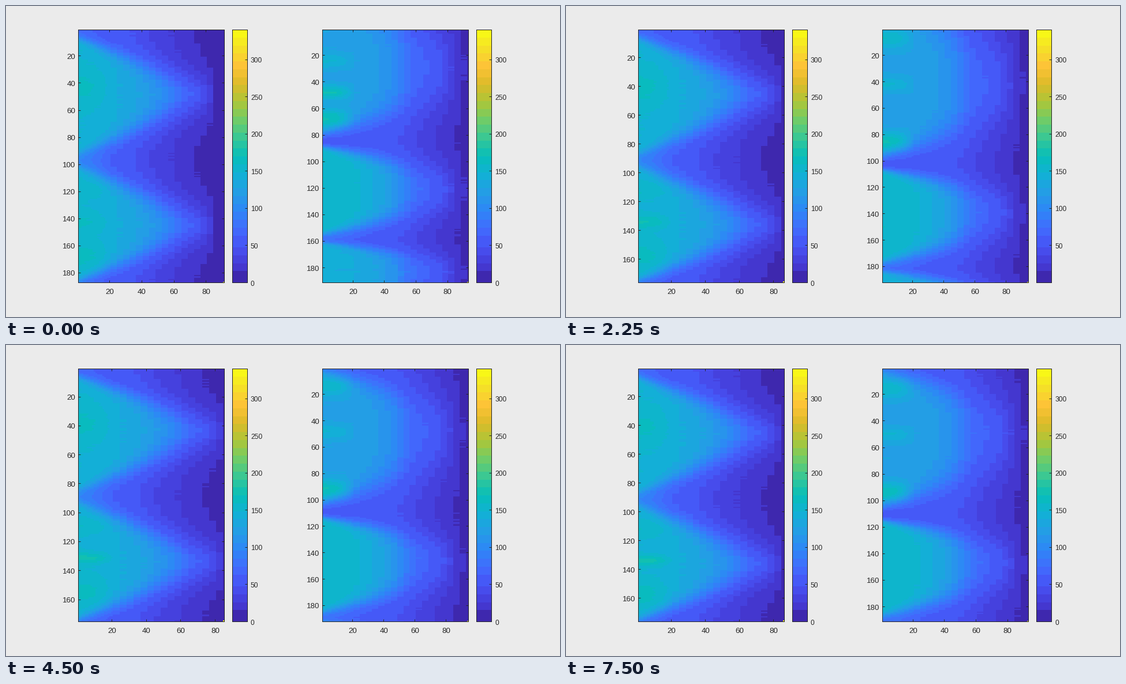
Recreate the animation shown at these times as a matplotlib script. Size 960 by 540 pixels, loop 8 s.

```python
import numpy as np
import matplotlib.pyplot as plt
from matplotlib.animation import FuncAnimation

W, H, DPI = 960, 540, 96
TOP, BOTTOM = 41, 481
HEIGHT = BOTTOM - TOP
VMAX = 340
INK = "#262626"
PX = 72 / DPI

plt.rcParams["font.family"] = "Liberation Sans"

# Colour scale, banded into coarse steps
RGB = np.array([
    (.242, .150, .660), (.271, .226, .835), (.281, .323, .958),
    (.258, .422, .995), (.179, .529, .968), (.143, .619, .900),
    (.069, .695, .839), (.030, .745, .726), (.216, .784, .592),
    (.442, .803, .406), (.672, .779, .223), (.870, .735, .160),
    (.997, .766, .220), (.960, .890, .154), (.977, .984, .081)])
EDGES = np.array([0, 3, 5, 7, 9, *range(12, 65, 2)]) / 64
MIDS = (EDGES[:-1] + EDGES[1:]) / 2
MIDS[0], MIDS[-1] = .01, .99
STOPS = np.linspace(0, 1, len(RGB))
BANDS = np.column_stack([np.interp(MIDS, STOPS, c) for c in RGB.T])


def colours(values):
    return BANDS[np.searchsorted(EDGES[1:-1], values / VMAX, side="right")]


# Each scene gives nodes (y, value at the left edge), alternating valley and
# ridge from the top, and spots (y, gain, half height).
def left_scene(step):
    dy = 1 - 7 * np.exp(-((step - 7) / 1.8) ** 2)
    streak = np.clip((step - 1) / 3, 0, 1)
    nodes = [(45, 70), (152 + dy, 148), (267 + dy, 93),
             (380 + dy, 148), (487, 72)]
    spots = [(140 + dy, 15, 34), (318 + dy, 11, 14),
             (374 + dy, 14 + 14 * streak, 18 - 9 * streak),
             (432 + dy, 16, 27)]
    return nodes, spots


def right_scene(step):
    dy = np.interp(step, [0, 1, 2, 4, 6, 10], [0, -4, 42, 38, 55, 60])
    top = np.interp(step, [4, 6], [-30, 32])
    nodes = [(top, 70), (110 + .7 * dy, 126), (236 + dy, 50),
             (318 + dy, 158), (405 + 1.25 * dy, 72),
             (460 + 1.3 * dy, 142), (550 + 1.3 * dy, 75)]
    spots = [(16 + dy, 33, 17), (96 + dy, 24, 13), (196 + dy, 46, 17),
             (150 + dy, 46 * max(0, 1 - dy / 40), 12)]
    return nodes, spots


LEFT = dict(
    x0=125, x1=379, scene=left_scene, seed=4, no_zero={2},
    rows=[187, 179, 181, 176, 176, 174, 175, 175, 173, 175, 176],
    width=(.90, .0105),
    ridge=([0, 20, 36, 45, 56, 60, 65, 72, 76, 80, 82, 84, 96],
           [150, 144, 131, 119, 99, 88, 75, 62, 50, 42, 28, 14, 8]),
    valley=([0, 9, 18, 29, 40, 48, 56, 64, 73, 92],
            [92, 80, 64, 53, 41, 33, 27, 21, 15, 6]))

RIGHT = dict(
    x0=548, x1=802, scene=right_scene, seed=9, no_zero={1, 3},
    rows=[191, 189, 192, 192, 193, 193, 192, 193, 194, 192, 191],
    width=(.90, .0070),
    ridge=([0, 19, 34, 45, 52, 57, 66, 73, 80, 84, 88, 96],
           [155, 150, 135, 115, 92, 80, 68, 58, 44, 30, 19, 10]),
    valley=([0, 10, 22, 40, 54, 62, 72, 82, 88, 94],
            [60, 60, 56, 50, 43, 34, 25, 18, 13, 8]))


def shape(p):
    """Rows and columns of the grid at each step."""
    return [(n, round(.4875 * n)) for n in p["rows"]]


def profile(p, kind, value, u, reach):
    xs, vs = p[kind]
    return np.interp(u, xs, vs) + (value - vs[0]) * np.exp(-(u / reach) ** 2)


def field(p, step):
    nr, nc = shape(p)[step]
    c = np.arange(nc)
    u = np.where(c < 20, c, c // 4 * 4 + 1.5)
    y = TOP + (np.arange(nr) + .5) * HEIGHT / nr
    nodes, spots = p["scene"](step)
    ys = np.array([n[0] for n in nodes])
    yc = np.clip(y, ys[0], ys[-1] - 1e-6)

    # Lobes are broad at the left edge and pointed further out
    start, slope = p["width"]
    half = np.maximum(start - slope * u, .15)
    soft = .035 + .0018 * u

    v = np.zeros((nr, nc))
    for i in range(len(nodes) - 1):
        m = (yc >= ys[i]) & (yc < ys[i + 1])
        r, b = (i, i + 1) if i % 2 else (i + 1, i)
        d = (np.abs(yc[m] - ys[r]) / (ys[i + 1] - ys[i]))[:, None]
        w = (1 + np.exp(-half / soft)) / (1 + np.exp((d - half) / soft))
        high = profile(p, "ridge", nodes[r][1], u, 45)
        low = profile(p, "valley", nodes[b][1], u, 20)
        v[m] = w * high + (1 - w) * low

    for cy, gain, tall in spots:
        v += gain * np.outer(np.exp(-((y - cy) / tall) ** 2),
                             np.exp(-(u / 17) ** 4))
    rng = np.random.default_rng(p["seed"] + 20 * step)
    v += np.outer(rng.normal(0, 1, nr), .3 + .7 * np.exp(-u / 20))
    v = np.clip(v, 0, VMAX)
    v[-1, -1] = VMAX
    return v


fig = plt.figure(figsize=(W / DPI, H / DPI), dpi=DPI, facecolor="#ebebeb")
ax = fig.add_axes([0, 0, 1, 1])


def line(xs, ys):
    ax.plot(xs, ys, color=INK, lw=PX, solid_capstyle="butt")


def image(values, x0, x1):
    ax.imshow(colours(values), extent=(x0, x1, BOTTOM, TOP), aspect="auto",
              interpolation="nearest")


def box(x0, x1):
    # Whole numbers snap to the centre of their pixel
    a, b, t, e = x0, x1 - 1, TOP, BOTTOM - 1
    line([a, b, b, a, a], [t, t, e, e, t])


def label(x, y, n, size, ha):
    ax.text(x, y, str(n), color=INK, fontsize=size, ha=ha,
            va="center_baseline")


def colour_bar(x0, x1, zero):
    image((np.arange(HEIGHT)[::-1, None] + .5) * VMAX / HEIGHT, x0, x1)
    box(x0, x1)
    for n in range(0 if zero else 50, VMAX, 50):
        y = BOTTOM - 1 - n * (HEIGHT - 1) / VMAX
        line([x1 - 5, x1 - 1], [y, y])
        label(x1 + 5, y + 1, n, 9, "left")


def panel(p, step):
    x0, x1 = p["x0"], p["x1"]
    v = field(p, step)
    nr, nc = v.shape
    image(v, x0, x1)
    box(x0, x1)
    for n in range(20, nr + 1, 20):
        y = TOP + (n - .5) * HEIGHT / nr
        line([x0, x0 + 4], [y - .5, y - .5])
        line([x1 - 5, x1 - 1], [y - .5, y - .5])
        label(x0 - 5, y + .5, n, 10, "right")
    for n in range(20, nc + 1, 20):
        x = x0 + (n - .5) * (x1 - x0) / nc
        line([x - .5, x - .5], [TOP, TOP + 4])
        line([x - .5, x - .5], [BOTTOM - 5, BOTTOM - 1])
        label(x, 496, n, 10, "center")
    colour_bar(x0 + 267, x0 + 294, step not in p["no_zero"])


def draw(frame):
    ax.clear()
    ax.axis("off")
    for p in (LEFT, RIGHT):
        panel(p, frame // 3)
    ax.set(xlim=(0, W), ylim=(H, 0))
    return ax.get_children()


anim = FuncAnimation(fig, draw, frames=32, interval=250, repeat=True,
                     repeat_delay=0, blit=False)
plt.show()
```
